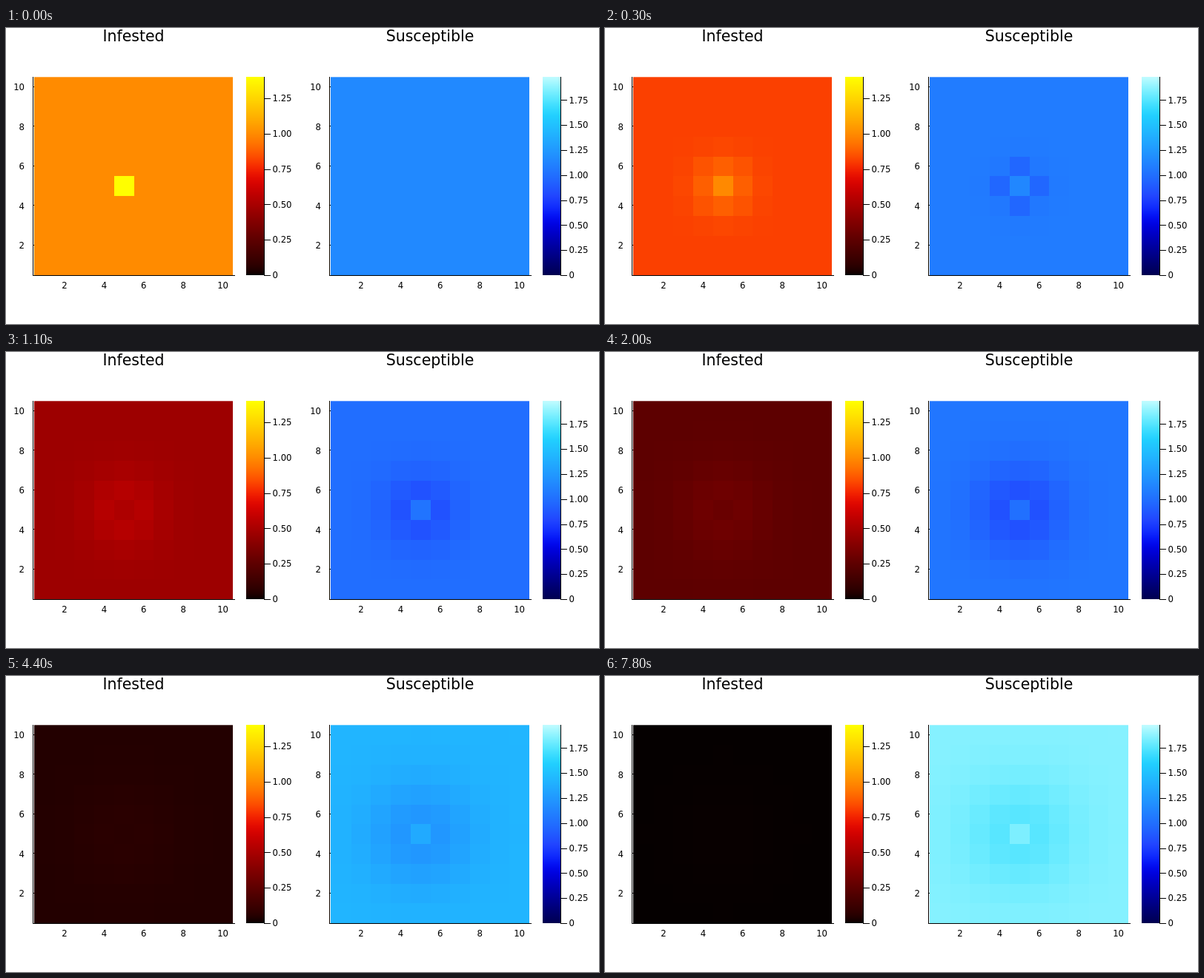
An HTML page with a canvas for the animation above (8000 ms loop, 800x400 px).

```html
<!DOCTYPE html>
<html lang="en">
<head>
<meta charset="utf-8">
<title>Infested and susceptible</title>
<style>
  html, body { margin: 0; width: 100%; height: 100%; overflow: hidden; background: #fff; }
  canvas { display: block; }
</style>
</head>
<body>
<canvas id="stage" width="800" height="400"></canvas>
<script>
const ctx = document.getElementById('stage').getContext('2d');
const LOOP = 8000, STEP = 100, LAST = 78;
const TOP = 66.3, BOTTOM = 334, SIZE = 10, SEED = 5;
const { exp, round, min, max } = Math;

const panels = [
  { title: 'Infested', x: 0, limit: 1.4, colour: heat, value: infested },
  { title: 'Susceptible', x: 400, limit: 1.98, colour: ice, value: susceptible }
];

// Both colour scales rise evenly in perceived lightness (0 to 100).
const RED = .2126, GREEN = .7152, BLUE = .0722;
const luminance = l => l > 8 ? ((l + 16) / 116) ** 3 : l / 903.3;
const softCap = x => x / (1 + x ** 8) ** (1 / 8);
const clamp = x => min(1, max(0, x));
const encode = v => 255 * (v > .0031 ? 1.055 * v ** (1 / 2.4) - .055 : 12.92 * v);
const rgb = (...light) => `rgb(${light.map(v => round(encode(clamp(v))))})`;

function heat(p) {
  const y = luminance(97 * clamp(p));
  const red = softCap(y / RED);
  return rgb(red, (y - RED * red) / GREEN, 0);
}

function ice(p) {
  const y = luminance(5 + 90 * clamp(p));
  const blue = softCap(y / BLUE);
  const tint = .15 * clamp((p - .25) / .15) + .6 * clamp((p - .8) / .2) ** 1.35;
  const red = tint ** 2.2;
  return rgb(red, (y - RED * red - BLUE * blue) / GREEN, blue);
}

const decay = t => exp(-.7 * t);
const bump = (t, d2) => exp(-d2 / (1 + 7 * (1 - exp(-t / 2))));
const pulse = x => x * exp(1 - x);

// Logistic growth under a fading infestation, one value per frame
const healthy = (() => {
  const values = [], dt = .01;
  let s = 1.153;
  for (let i = 0; i <= LAST * 10; i++) {
    if (i % 10 === 0) values.push(s);
    const load = decay(i * dt);
    s += dt * s * (.57 * (1 - s / 2) - .82 * load / (1 + .6 * load));
  }
  return values;
})();

// d2 is the squared distance from the seed cell.
function infested(frame, d2) {
  const t = frame / 10;
  const spread = .13 * (1 - exp(-t / .12)) + .08 * t;
  const core = d2 ? 0 : .52 * exp(-t / .32) - .12;
  return decay(t) * (1 + spread * bump(t, d2) + core);
}

function susceptible(frame, d2) {
  const t = frame / 10;
  let change = -.25 * pulse(t / 2.8) * bump(t, d2);
  if (d2 === 0) change += .26 * (1 - exp(-t / .4)) * exp(-t / 8);
  if (d2 === 1) change -= .08 * pulse(t / .25);
  return healthy[frame] + change;
}

function text(label, x, y, align, size = 11.7) {
  ctx.font = `${size}px "DejaVu Sans", sans-serif`;
  ctx.textAlign = align;
  ctx.fillText(label, x, y);
}

const columnEdge = i => i ? round(39 + 26.7 * i) : 38;
const rowEdge = i => i ? round(66.5 + 26.75 * i) : TOP;

function drawCells({ limit, colour, value }, frame) {
  for (let row = 0; row < SIZE; row++) {
    for (let col = 0; col < SIZE; col++) {
      const d2 = (col + 1 - SEED) ** 2 + (SIZE - row - SEED) ** 2;
      const x = columnEdge(col), y = rowEdge(row);
      ctx.fillStyle = colour(value(frame, d2) / limit);
      ctx.fillRect(x, y, columnEdge(col + 1) - x, rowEdge(row + 1) - y);
    }
  }
}

function drawAxes(title) {
  ctx.fillStyle = '#000';
  text(title, 172, 18, 'center', 20.5);
  ctx.fillRect(36, 66, 1, 269);
  ctx.fillRect(36, 334, 273, 1);
  for (let n = 2; n <= SIZE; n += 2) {
    const y = BOTTOM - 26.75 * (n - .5);
    ctx.fillRect(36, round(y) - 1, 2, 1);
    text(n, 25, y + 4.3, 'right');
    text(n, 79 + 26.7 * (n - 2), 352, 'center');
  }
}

function drawColourBar({ limit, colour }) {
  const height = BOTTOM - TOP;
  for (let y = 66; y < BOTTOM; y++) {
    ctx.fillStyle = colour((BOTTOM - y - .5) / height);
    ctx.fillRect(324, y, 24, 1);
  }
  ctx.fillStyle = '#000';
  ctx.fillRect(348, 66, 1, 269);
  for (let v = 0; v < limit; v += .25) {
    const y = BOTTOM - v / limit * height;
    ctx.fillRect(348, round(y), 9, 1);
    text(v ? v.toFixed(2) : '0', 359.5, y + 4.3, 'left');
  }
}

function draw(now) {
  const frame = min(LAST, Math.floor(now % LOOP / STEP));
  ctx.fillStyle = '#fff';
  ctx.fillRect(0, 0, 800, 400);
  for (const panel of panels) {
    ctx.save();
    ctx.translate(panel.x, 0);
    drawCells(panel, frame);
    drawAxes(panel.title);
    drawColourBar(panel);
    ctx.restore();
  }
}

const start = performance.now();
function tick() {
  draw(performance.now() - start);
  requestAnimationFrame(tick);
}
tick();
</script>
</body>
</html>
```
